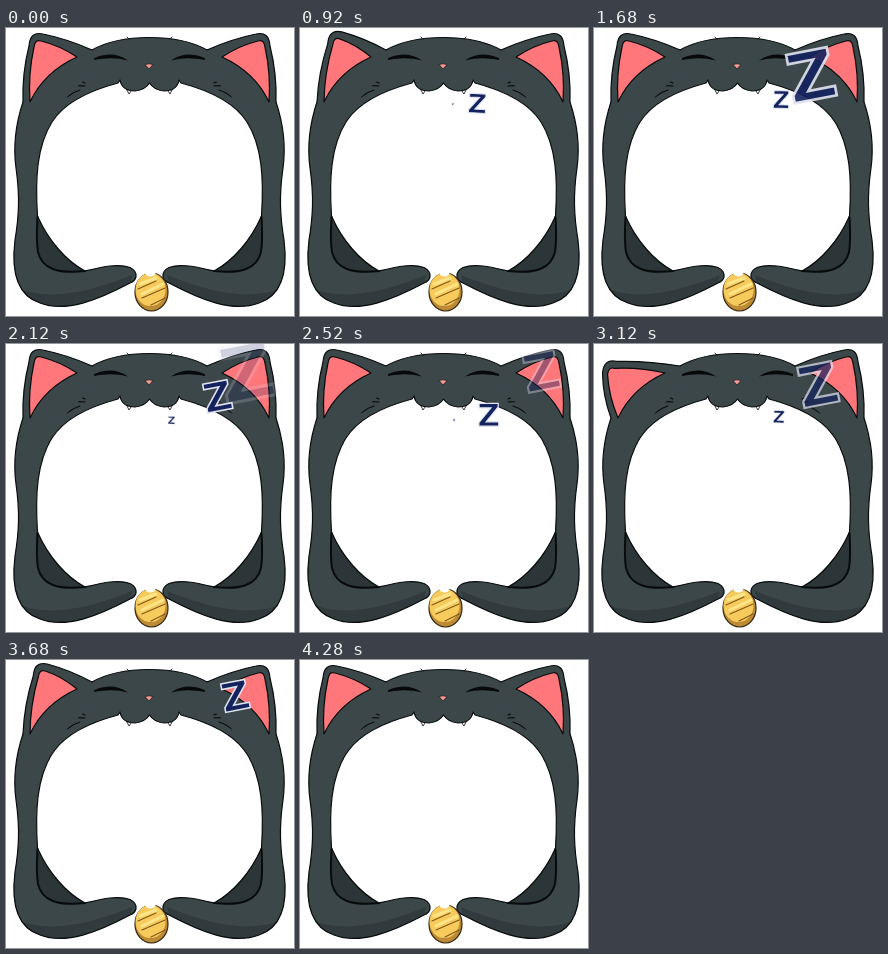
Recreate the animation shown at these times as an HTML page. Size 288 px wide and 288 px high, loop 5120 ms.

```html
<!DOCTYPE html>
<html lang="en">
<head>
<meta charset="utf-8">
<title>Sleeping cat frame</title>
<style>
html, body { margin: 0; width: 100%; height: 100%; overflow: hidden; background: #fff; }
svg { display: block; width: 100%; height: 100%; }
.line { fill: none; stroke: #080b0c; stroke-linecap: round; stroke-linejoin: round; }
.fur { fill: #3c474a; }
.pink { fill: #ff777b; stroke: #080b0c; stroke-width: 1.2; stroke-linejoin: round; }
#sleep text {
  font: bold 100px "DejaVu Sans", sans-serif; text-anchor: middle;
  fill: #14235e; stroke: #dfe3f0; stroke-width: 4;
}
</style>
</head>
<body>
<svg viewBox="0 0 288 288">
  <defs>
    <path id="outer" d="M86 22C100 14 118 9.500 143.500 9.500M17 74C10 95 7 118 10 140C14 168 13 188 9 212C6 236 7 266 34 275C60 285 92 272 124 255Q129 253 130 249Q131 243 124 239.500C112 235 96 239 79 243C60 233 42 212 31.500 188C29 150 31 118 46 94C58 75 82 63 112 55L114 52Q116 63 129 63Q139 62 143.500 55"/>
    <g id="half">
      <path class="fur" d="M144 9.500C118 9.500 100 14 86 22L17 74C10 95 7 118 10 140C14 168 13 188 9 212C6 236 7 266 34 275C60 285 92 272 124 255Q129 253 130 249Q131 243 124 239.500C112 235 96 239 79 243C60 233 42 212 31.500 188C29 150 31 118 46 94C58 75 82 63 112 55L114 52Q116 63 129 63Q139 62 144 55Z"/>
      <path fill="#2c3538" d="M31.500 188C42 212 60 233 79 243C56 247 34 243 31 219Z"/>
      <path fill="#2c3538" opacity=".65" d="M17 262C45 272 85 264 126 247L124 255C92 272 60 285 34 275Q22 271 17 262Z"/>
      <use href="#outer" class="line" stroke-width="1.2"/>
      <path class="line" stroke-width="2" d="M31.500 189C31 200 30 212 32 224C36 241 52 246 79 243"/>
      <path class="line" stroke-width="1.1" d="M64 50Q72 51 79 55M59 59Q69 57 79 58M61 69Q67 64 74 62"/>
      <path class="line" stroke-width=".8" d="M121 62l2 4 2-3M121 9l2 2"/>
      <path fill="#07090a" d="M83 33Q104 20.500 122 32.500Q104 28 83 33Z"/>
    </g>
  </defs>

  <use href="#half"/>
  <use href="#half" transform="translate(287) scale(-1 1)"/>
  <g class="ear"><path class="fur"/><path class="line" stroke-width="1.2"/><path class="pink"/></g>
  <g class="ear" transform="translate(287) scale(-1 1)"><path class="fur"/><path class="line" stroke-width="1.2"/><path class="pink"/></g>
  <path fill="#f59a91" stroke="#14191a" stroke-width=".7" stroke-linejoin="round" d="M139 36.500Q143 35 147 36.500L143 41Z"/>

  <ellipse cx="145.500" cy="264" rx="16.500" ry="19" fill="#bd8a35" stroke="#33270f" stroke-width="1.2"/>
  <ellipse cx="144.500" cy="261.500" rx="15" ry="16.500" fill="#f6cb5c"/>
  <g fill="none" stroke-linecap="round">
    <path stroke="#ffe58a" stroke-width="3" d="M134 256L150 250M136 266L157 256"/>
    <path stroke="#80591c" stroke-width="1.2" d="M132 261L150 253M136 270L159 260M145 277L159 270"/>
  </g>
  <ellipse cx="144.500" cy="245" rx="5" ry="3.500" fill="#fff"/>
  <g id="sleep"></g>
</svg>
<script>
const LOOP = 5120, START = 200, CYCLE = 1160, STEP = 80;
const TWITCHES = [200, 2680], TWITCH_TIME = 1080;

const zs = [
  { start: 200, life: 1900, size: 54, span: 90 },
  { start: 880, life: 1760, size: 36, span: 98 },
  { start: 1700, life: 1650, size: 42, span: 91 },
  { start: 2440, life: 1760, size: 34, span: 122 }
];

const clamp = v => Math.max(0, Math.min(1, v));
const smooth = v => (v = clamp(v), v * v * (3 - 2 * v));

const layer = document.getElementById("sleep");
for (const z of zs) {
  z.el = document.createElementNS("http://www.w3.org/2000/svg", "text");
  z.el.textContent = "Z";
  z.el.setAttribute("y", 36.5);
  layer.appendChild(z.el);
}
const [leftEar, rightEar] = document.querySelectorAll(".ear");

// The picture advances in steps, the last one of each cycle a little longer.
function hold(t) {
  if (t < START) return 0;
  const phase = (t - START) % CYCLE;
  return t - phase + Math.min(13, Math.floor(phase / STEP)) * STEP;
}

// The base of the ear stays on the head while its tip swings.
function drawEar(ear, degrees) {
  const a = degrees * Math.PI / 180, c = Math.cos(a), s = Math.sin(a);
  const x = 50 - 23 * c + 44 * s, y = 50 - 44 * c - 23 * s;
  const edge = `M86 22Q${(x + 96) / 2} ${(y + 16) / 2} ${x + 10} ${y}` +
    `Q${x - 3} ${y - 3} ${x - 4} ${y + 12}Q${(x + 5) / 2} ${(y + 86) / 2} 17 74`;
  const inner = `M71 29Q${(x + 80) / 2} ${(y + 29) / 2} ${x + 8} ${y + 7}` +
    `Q${x + 2} ${y + 5} ${x + 1} ${y + 13}Q${(x + 17) / 2} ${(y + 87) / 2} 24 74Q38 44 71 29Z`;
  [edge + "L40 90L90 40Z", edge, inner].forEach((d, i) => ear.children[i].setAttribute("d", d));
}

// Down and out, then a smaller swing inward.
function earAngle(t) {
  return TWITCHES.reduce((sum, start) => {
    const swing = Math.sin(2 * Math.PI * clamp((t - start) / TWITCH_TIME) ** 1.25);
    return sum - swing * (swing > 0 ? 22 : 10);
  }, 0);
}

function drawZ({ el, start, life, size, span }, t) {
  const u = (t - start) / life;
  const shown = u > 0 && u < 1;
  el.style.display = shown ? "" : "none";
  if (!shown) return;
  const x = 152 + span * u ** 1.3;
  const y = 76 - 54 * smooth((x - 172) / 86);
  const tilt = 3 - 14 * smooth((u - 0.4) / 0.3);
  const scale = (2 + size * smooth(u)) / 73;
  el.setAttribute("transform", `translate(${x} ${y}) rotate(${tilt}) scale(${scale})`);
  el.setAttribute("opacity", clamp((1.05 - u) / 0.3));
}

function draw(time) {
  const t = hold(time % LOOP);
  drawEar(leftEar, earAngle(t));
  for (const z of zs) drawZ(z, t);
}

drawEar(rightEar, 0);
const begin = performance.now();
function tick() {
  draw(performance.now() - begin);
  requestAnimationFrame(tick);
}
tick();
</script>
</body>
</html>
```
